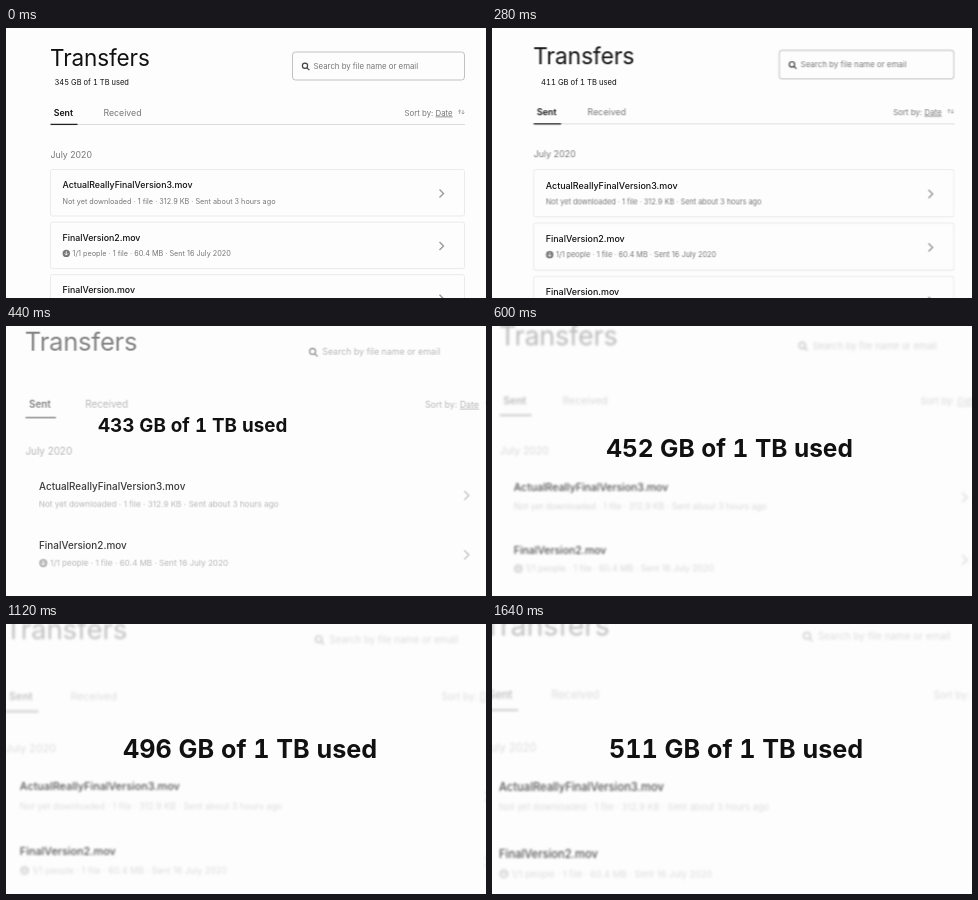
Recreate the animation shown at these times as an HTML page. Size 480 by 270 pixels, loop 1680 ms.

```html
<!DOCTYPE html>
<html lang="en">
<head>
<meta charset="utf-8">
<style>
  html, body { margin: 0; width: 100%; height: 100%; overflow: hidden; background: #fdfdfd; }
  svg { display: block; width: 480px; height: 270px; font-family: Inter, "Liberation Sans", sans-serif; }
  text { fill: #777; white-space: pre; }
  .title { font-size: 22.5px; letter-spacing: -.005em; fill: #111; }
  .tab { font-size: 8.75px; }
  .active { font-weight: 600; fill: #111; }
  .small { font-size: 7.8px; }
  .meta { font-size: 7.25px; }
  .name { font-size: 8.8px; font-weight: 500; fill: #111; }
  .line { fill: none; stroke: #999; }
  .frame { fill: none; stroke: #ebebeb; }
  .headline { fill: #111; font-variant-numeric: tabular-nums; }
  #bold { font-weight: 700; }
</style>
</head>
<body>
<svg viewBox="0 0 480 270">
  <g id="blur"><g id="page">
    <g id="boxes">
      <rect class="frame" x="286.5" y="24" width="172" height="28" rx="3" style="stroke:#c2c2c2"/>
      <path class="frame" d="M44.5 96.5H459" style="stroke:#dcdcdc"/>
      <g id="cards"></g>
    </g>
    <g id="faint">
      <text class="title" x="44" y="37.5">Transfers</text>
      <g class="line" style="stroke:#444;stroke-width:1.2">
        <circle cx="299" cy="37.8" r="2.6"/><path d="M301 39.8l2.4 2.4"/>
      </g>
      <text class="small" x="307.6" y="41">Search by file name or email</text>
      <text class="tab active" x="47.7" y="87.5">Sent</text>
      <path class="line" d="M44.5 96.4h27" style="stroke:#222;stroke-width:1.3"/>
      <text class="tab" x="97.5" y="87.5">Received</text>
      <text class="small" x="398.6" y="87.5">Sort by: <tspan text-decoration="underline">Date</tspan></text>
      <path class="line" d="M453.6 86v-4m-1.4 1.4l1.4-1.4 1.4 1.4M457 82v4m-1.4-1.4l1.4 1.4 1.4-1.4" style="stroke-width:.8"/>
      <text class="tab" x="44.5" y="129.5">July 2020</text>
      <g id="details"></g>
    </g>
    <g id="names"></g>
  </g></g>
  <text id="plain" class="headline"></text>
  <text id="bold" class="headline"></text>
</svg>
<script>
const LOOP = 1680, STEP = 40;
const $ = id => document.getElementById(id);
const mix = (a, b, p) => a + (b - a) * p;
const clamp = v => Math.min(1, Math.max(0, v));

const files = [
  { name: 'ActualReallyFinalVersion3.mov', meta: 'Not yet downloaded · 1 file · 312.9 KB · Sent about 3 hours ago' },
  { name: 'FinalVersion2.mov', meta: '1/1 people · 1 file · 60.4 MB · Sent 16 July 2020', icon: true },
  { name: 'FinalVersion.mov', meta: '' }
];

files.forEach(({ name, meta, icon }, i) => {
  const at = `<g transform="translate(44.5 ${141.5 + 52.6 * i})">`;
  $('cards').innerHTML += `${at}<rect class="frame" width="414" height="46.5" rx="2"/></g>`;
  $('names').innerHTML += `${at}<text class="name" x="12" y="18.8">${name}</text></g>`;
  $('details').innerHTML += `${at}
    <text class="meta" x="${icon ? 22 : 12}" y="34">${meta}</text>
    <path class="line" d="M389 20l4 4-4 4" style="stroke-width:1.4"/>
    ${icon ? `<circle cx="15.8" cy="31.3" r="3.7" fill="#777"/>
      <path class="line" d="M15.8 29v4m-1.7-1.7l1.7 1.7 1.7-1.7" style="stroke:#fff;stroke-width:.8"/>` : ''}</g>`;
});

// Sharp start, soft landing.
const travel = t => Math.exp(-Math.exp((387 - t) / 67.6));
const zoom = t => 1 + .153 * travel(t) + 7.1e-5 * t * Math.min(1, t / 400);
// Slows down to the end, after an extra sprint at the start.
const used = t => 511.5 - 5.1e-5 * (LOOP - t) ** 2 - 22.6 * Math.exp(-((t / 188) ** 3));

function headline(id, size, p, opacity, label) {
  const el = $(id);
  el.textContent = label;
  el.setAttribute('x', mix(48.5, 117, p));
  el.setAttribute('y', mix(54, 125, p) + size * .36);
  el.style.fontSize = size + 'px';
  el.style.opacity = opacity;
}

function draw(t) {
  const p = travel(t);
  $('page').setAttribute('transform', `translate(240 135) scale(${zoom(t)}) translate(-240 -135)`);
  $('blur').style.filter = p > .01 ? `blur(${p}px)` : 'none';
  $('boxes').style.opacity = clamp(1 - 2.2 * p);
  $('faint').style.opacity = mix(1, .25, p);
  $('names').style.opacity = mix(1, .72, p);

  const label = `${Math.round(used(t))} GB of 1 TB used`;
  const fade = clamp((p - .05) / .35);
  headline('plain', mix(7.5, 25.2, p), p, 1 - fade, label);
  headline('bold', mix(7.7, 25.2, p), p, fade, label);
}

function tick() {
  draw(Math.floor(performance.now() % LOOP / STEP) * STEP);
  requestAnimationFrame(tick);
}
tick();
</script>
</body>
</html>
```
